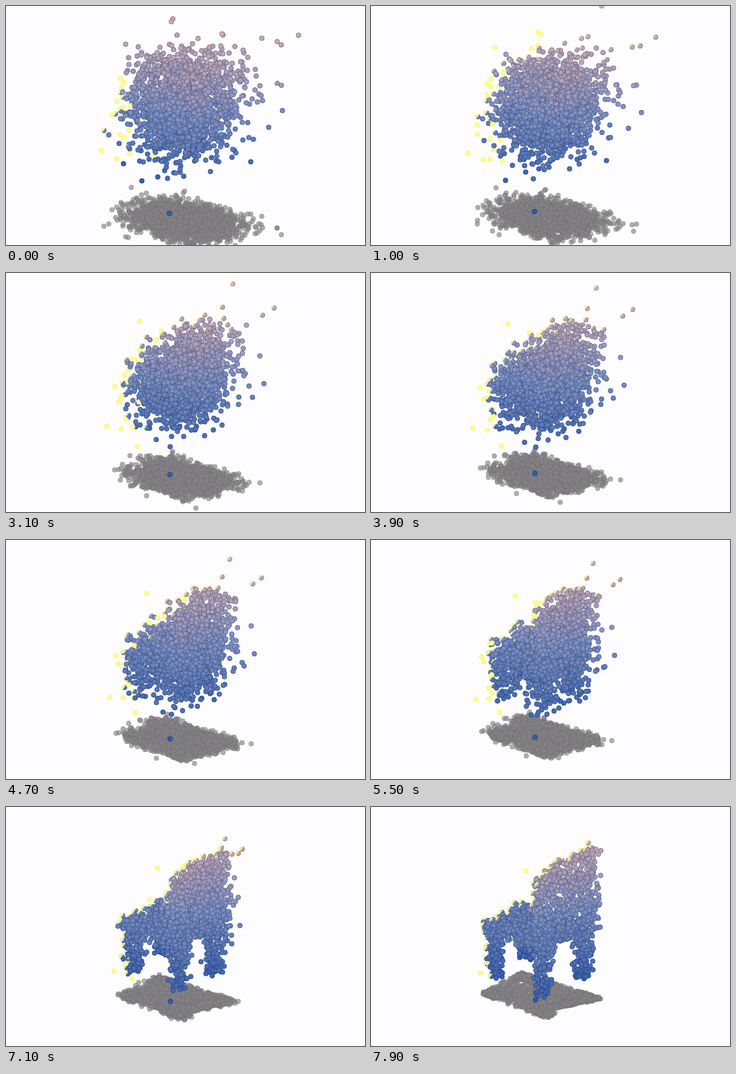
Animation of 600 by 400 pixels, one loop 8 s. Source, as an HTML page with a canvas:

```html
<!DOCTYPE html>
<html lang="en">
<head>
<meta charset="utf-8">
<title>Point cloud settling into a chair</title>
<style>
  html, body { margin: 0; width: 100%; height: 100%; overflow: hidden; background: #fdfdff; }
  canvas { display: block; }
</style>
</head>
<body>
<canvas id="stage" width="600" height="400"></canvas>
<script>
const ctx = document.getElementById('stage').getContext('2d');
const LOOP = 8000, STEP = 100, LAST = 7900, COUNT = 2048, RADIUS = 4;
const TAU = Math.PI * 2;
const LIGHT = { x: -0.8, y: -0.6, angle: Math.atan2(-0.6, -0.8) };
const YELLOW = 'rgb(255,255,140)', YELLOW_EDGE = 'rgb(246,238,120)';

let seed = 20231;
function random() {
  seed = (seed + 0x6D2B79F5) | 0;
  let n = Math.imul(seed ^ (seed >>> 15), 1 | seed);
  n = (n + Math.imul(n ^ (n >>> 7), 61 | n)) ^ n;
  return ((n ^ (n >>> 14)) >>> 0) / 4294967296;
}
const between = (a, b) => a + (b - a) * random();
const lerp = (a, b, p) => a + (b - a) * p;
const mix = (a, b, p) => a.map((value, i) => lerp(value, b[i], p));
function gauss() {
  for (;;) {
    const g = Math.sqrt(-2 * Math.log(1 - random())) * Math.cos(TAU * random());
    if (Math.abs(g) < 2.1) return g;
  }
}

// Chair in floor coordinates u, v (-1..1) and height h in pixels.
function leg() {
  const su = random() < 0.5 ? -1 : 1, sv = random() < 0.5 ? -1 : 1;
  const h = between(0, 92), spread = 0.16 + h * 0.0009;
  return [su * 0.77 + between(-spread, spread),
          sv * (0.7 + h * 0.0008) + between(-spread, spread), h];
}
function seat() {
  return [between(-1, 1), between(-1, 0.8), between(73, 96)];
}
function back() {
  const u = between(-0.88, 0.92);
  const top = 220 + 11 * u - 25 * Math.max(0, -u - 0.2);
  return [u, 0.72 + 0.25 * u + between(-0.08, 0.12), between(93, top)];
}
function chairPoint() {
  const pick = random();
  return pick < 0.27 ? leg() : pick < 0.61 ? seat() : back();
}

// Noise leans toward the chair and tilts along v with height; a few points stray far out.
const CENTER = [0.1, 0.35, 138], SPREAD = [0.6, 0.6, 43], TILT = 0.0028;
const cloud = Array.from({ length: COUNT }, () => {
  const end = chairPoint();
  const reach = random() < 0.04 ? 1.45 : 1;
  const start = CENTER.map((c, i) => lerp(c, end[i], 0.28) + gauss() * SPREAD[i] * reach);
  start[1] += (start[2] - CENTER[2]) * TILT;
  return { start, end };
});

// Landmark dots that drift well outside the cloud, in screen pixels.
const loners = [
  { from: [489, 49], to: [384, 73] },
  { from: [389, -9], to: [363, 60] },
  { from: [460, 65], to: [380, 79] },
  { from: [462, 175], to: [383, 201] },
  { from: [439, 203], to: [370, 216] },
  { from: [200, 64], to: [259, 107] },
  { from: [159, 242], to: [183, 278] },
  { from: [273, 347], to: [275, 323] }
];

const DEEP_BLUE = [46, 92, 176], LAVENDER = [126, 145, 200], PINK = [226, 176, 176];
function heightColor(h) {
  const p = Math.min(1, Math.max(0, (h + 20) / 300)) * 2;
  return p < 1 ? mix(DEEP_BLUE, LAVENDER, p) : mix(LAVENDER, PINK, p - 1);
}
const rgb = (color, shade = 1) => `rgb(${color.map(c => Math.round(c * shade)).join()})`;

function project([u, v, h], baseY) {
  return [277 + 40 * u + 61 * v + 6 * u * v, baseY - 18 * u + 21 * v - h];
}

function dot(x, y, fill, edge) {
  ctx.beginPath();
  ctx.arc(x, y, RADIUS, 0, TAU);
  ctx.fillStyle = fill;
  ctx.fill();
  ctx.strokeStyle = edge;
  ctx.stroke();
}

// Sunlit rim; inner is the half-width of the unlit part (0 = half the dot).
function rim(x, y, inner) {
  const quarter = Math.PI / 2, outer = RADIUS + 0.4, { angle } = LIGHT;
  ctx.beginPath();
  ctx.arc(x, y, outer, angle - quarter, angle + quarter);
  ctx.ellipse(x, y, inner * RADIUS, outer, angle, quarter, -quarter, true);
  ctx.fillStyle = YELLOW;
  ctx.fill();
}

// Per narrow lane along the light: the outermost dot and its gap to the next one.
function findLit(dots) {
  const lanes = new Map();
  for (const d of dots) {
    const key = Math.round((d.y * LIGHT.x - d.x * LIGHT.y) / 5);
    const reach = d.x * LIGHT.x + d.y * LIGHT.y;
    const lane = lanes.get(key);
    if (!lane) lanes.set(key, { d, reach, next: -Infinity });
    else if (reach > lane.reach) Object.assign(lane, { d, reach, next: lane.reach });
    else lane.next = Math.max(lane.next, reach);
  }
  return new Map(Array.from(lanes.values(), l => [l.d, l.reach - l.next]));
}

function drawFloor(points, p) {
  const baseY = lerp(355, 315, p), shade = lerp(512, 496, p);
  for (const [u, v] of points) {
    const [x, y] = project([u, v, 0], baseY);
    if (x + y < shade) dot(x, y, YELLOW, YELLOW_EDGE);
    else dot(x, y, 'rgba(133,131,136,0.65)', 'rgba(104,104,98,0.4)');
  }
}

function drawCloud(points, p, seconds) {
  const dots = points.map(point => {
    const [x, y] = project(point, 289);
    return { x, y, h: point[2], depth: 21 * point[1] - 18 * point[0] };
  }).sort((a, b) => a.depth - b.depth);
  for (const { from, to } of loners) {
    const [x, y] = mix(from, to, p);
    dots.push({ x, y, h: 294 - y });
  }

  const lit = findLit(dots), sunTop = 120 - 90 * seconds;
  for (const d of dots) {
    const { x, y } = d, color = heightColor(d.h);
    const sunny = lit.has(d) && y < 300 && y > sunTop;
    if (sunny && x < 300 && lit.get(d) > 12) {
      dot(x, y, YELLOW, YELLOW_EDGE);
    } else {
      dot(x, y, rgb(color), rgb(color, 0.66));
      if (sunny) rim(x, y, x < 200 ? 0.1 : lerp(0.85, 0.3, p));
    }
  }
}

function draw(time) {
  const p = time / LAST;
  ctx.fillStyle = '#fdfdff';
  ctx.fillRect(0, 0, 600, 400);
  ctx.lineWidth = 0.9;
  const points = cloud.map(({ start, end }) => mix(start, end, p * 0.97));
  drawFloor(points, p);
  drawCloud(points, p, time / 1000);
}

let shown = -1;
const origin = performance.now();
function tick() {
  const elapsed = (performance.now() - origin) % LOOP;
  const time = Math.floor(elapsed / STEP) * STEP;
  if (time !== shown) draw(shown = time);
  requestAnimationFrame(tick);
}
tick();
</script>
</body>
</html>
```
